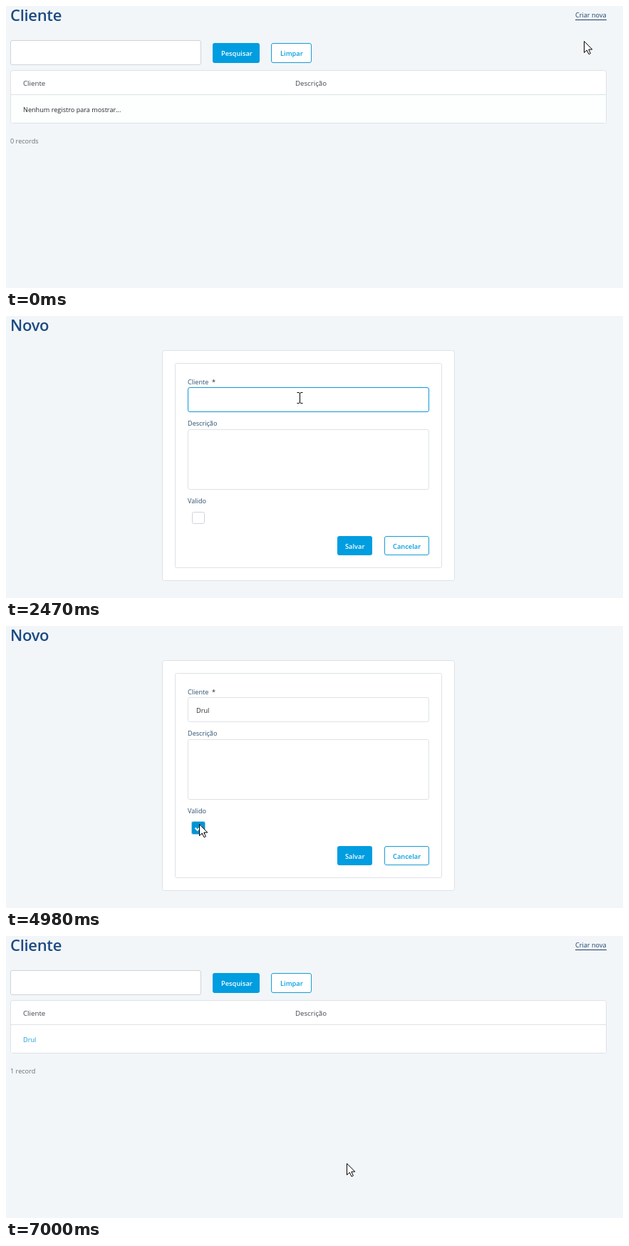
An HTML page for the animation above (7240 ms loop, 866 by 396 pixels).

```html
<!DOCTYPE html>
<html lang="pt">
<head>
<meta charset="utf-8">
<title>Cliente</title>
<style>
html, body { margin: 0; width: 100%; height: 100%; overflow: hidden; background: #f2f6f9; }
svg { display: block; width: 866px; height: 396px; }
text { font: 9.15px "Open Sans", "Noto Sans", sans-serif; fill: #272b30; white-space: pre; }
.title { font-size: 22px; font-weight: 600; letter-spacing: -.3px; fill: #1d4b82; }
.head { font-size: 9.7px; fill: #3d4650; }
.label { fill: #2b506f; }
.muted { fill: #6a7178; }
.button { font-size: 9.3px; font-weight: 600; fill: #009de0; }
.light { fill: #fff; }
.box { fill: #fff; stroke: #dee2e6; }
.field { stroke: #ced4da; }
.outline { stroke: #1a9bd3; }
.solid { fill: #009de0; }
.cursor path { fill: #fff; stroke: #000; stroke-linejoin: round; }
.cursor #beam { fill: none; }
</style>
</head>
<body>
<svg viewBox="0 0 866 396">
  <g id="list">
    <text class="title" x="6" y="21">Cliente</text>
    <text id="create" x="799" y="16">Criar nova</text>
    <path id="underline" d="M799 19.5H843"/>
    <rect class="box field" x="6.5" y="48.5" width="267" height="34" rx="2.5"/>
    <rect class="solid" x="290" y="52" width="66" height="28" rx="3"/>
    <text class="button light" x="302" y="70">Pesquisar</text>
    <rect class="box outline" x="372.5" y="52.5" width="56" height="27" rx="2.5"/>
    <text class="button" x="385" y="70">Limpar</text>
    <rect class="box" x="6.5" y="90.5" width="836" height="74" rx="3"/>
    <rect id="row" x="7" y="125" width="835" height="39" rx="2"/>
    <path d="M7 124.5H842" stroke="#dee2e6"/>
    <text class="head" x="24" y="112">Cliente</text>
    <text class="head" x="406" y="112">Descrição</text>
    <text id="cell" x="24" y="149"></text>
    <text id="count" class="muted" x="6" y="193"></text>
  </g>
  <g id="form">
    <text class="title" x="6" y="21">Novo</text>
    <rect class="box" x="219.5" y="48.5" width="410" height="323" rx="3"/>
    <rect class="box" x="237.5" y="66.5" width="374" height="287" rx="2"/>
    <text class="label" x="255" y="96">Cliente</text>
    <text x="289" y="96">*</text>
    <rect id="input" class="box" x="255.5" y="100.5" width="338" height="34" rx="2.5"/>
    <text id="typed" x="267" y="122"></text>
    <rect id="caret" y="111" width="1" height="13"/>
    <text class="label" x="255" y="154">Descrição</text>
    <rect class="box" x="255.5" y="159.5" width="338" height="84" rx="2.5"/>
    <text class="label" x="255" y="263">Valido</text>
    <rect class="box field" x="261.5" y="275.5" width="17" height="16" rx="2"/>
    <g id="checked">
      <rect id="ring" x="260" y="274" width="20" height="19" rx="3" fill="#a5cfe6"/>
      <rect x="261" y="275" width="18" height="17" rx="2" fill="#0094d6"/>
      <path d="M265.5 283.5L268.7 286.7 274.5 280.5" fill="none" stroke="#fff" stroke-width="2"/>
    </g>
    <rect id="save" x="465" y="309" width="49" height="27" rx="3"/>
    <text class="button light" x="476" y="327">Salvar</text>
    <rect class="box outline" x="531.5" y="309.5" width="62" height="26" rx="2.5"/>
    <text class="button" x="543" y="327">Cancelar</text>
  </g>
  <g id="cursor" class="cursor">
    <path id="arrow" d="M.5 .5V16.5L4.3 13 7 18.7 9.4 17.6 6.8 12H11.8z"/>
    <path id="hand" d="M-2 14V2Q-2 .5-.3 .5T1.5 2V9Q3 7.5 4.3 9.3 6 8.3 7 10 9.5 9.8 9.5 12V16Q9.5 19 7.5 21V23.5H-1.5V21.5L-6 15.5Q-7 13-5 12.5-4 12-2 14zM1.5 9V13M4.3 9.5V13M7 10.5V13"/>
    <path id="beam" d="M-3.5 -7.5H-1L.5 -6.5 2 -7.5H4.5M.5 -6.5V6.5M-3.5 7.5H-1L.5 6.5 2 7.5H4.5"/>
  </g>
</svg>
<script>
const LOOP = 7240;
const CLIENT = 'Drul';
const $ = id => document.getElementById(id);

// Bursts of screen updates: first time, last time, number of updates.
const bursts = [
  [0, 0, 1], [80, 250, 3], [400, 760, 6], [1160, 1230, 2], [1460, 1700, 4],
  [1940, 2090, 3], [2470, 2560, 2], [2790, 2790, 1], [2940, 3030, 2], [3490, 3490, 1],
  [3890, 4600, 10], [4750, 5440, 10], [5520, 6150, 9], [6320, 6550, 4], [6920, 7000, 2]
];

// Pointer track: time, x, y, shape from that time on.
const track = [
  [0, 811, 49, 'arrow'], [165, 813, 36, 'arrow'], [250, 817, 22, 'arrow'], [400, 820, 16, 'arrow'],
  [472, 823, 8, 'hand'], [544, 827, 1, 'hand'], [620, 828, 3, 'hand'], [760, 827, 10, 'hand'],
  [1400, 827, 10, 'hand'], [1460, 690, 48, 'arrow'], [1540, 510, 90, 'arrow'], [1620, 412, 115, 'beam'],
  [3850, 412, 115, 'beam'], [4125, 340, 190, 'beam'], [4205, 324, 220, 'beam'], [4280, 308, 246, 'arrow'],
  [4440, 283, 275, 'arrow'], [4600, 271, 278, 'arrow'], [5060, 271, 278, 'arrow'], [5215, 297, 284, 'arrow'],
  [5360, 354, 298, 'arrow'], [5440, 386, 307, 'arrow'], [5520, 417, 313, 'arrow'], [5598, 446, 318, 'arrow'],
  [5677, 467, 321, 'hand'], [5910, 478, 319, 'hand'], [6550, 478, 319, 'arrow'], [LOOP, 478, 319, 'arrow']
];

const between = (t, from, to) => t >= from && t < to;
const ramp = (t, from, to) => Math.min(1, Math.max(0, (t - from) / (to - from)));
const mix = (a, b, k) => a + (b - a) * k;
const blend = (a, b, k) => `rgb(${a.map((v, i) => Math.round(mix(v, b[i], k)))})`;
const show = (id, visible) => $(id).setAttribute('visibility', visible ? 'inherit' : 'hidden');
const fill = (id, color) => $(id).setAttribute('fill', color);

function lastUpdate(t) {
  const [start, end, count] = bursts.findLast(b => b[0] <= t);
  if (t >= end || count < 2) return Math.min(t, end);
  const step = (end - start) / (count - 1);
  return start + Math.floor((t - start) / step + 1e-6) * step;
}

function drawList(t) {
  const saved = t >= 6920;
  const hover = between(t, 472, 1160) ? ramp(t, 400, 620) : 0;
  const link = blend([29, 64, 104], [42, 132, 196], hover);
  $('create').style.fill = link;
  $('underline').setAttribute('stroke', link);
  fill('row', blend([252, 255, 254], [255, 255, 255], saved ? 1 : ramp(t, 0, 250)));
  $('cell').textContent = saved ? CLIENT : 'Nenhum registro para mostrar...';
  $('cell').style.fill = saved ? '#1a9fd8' : '';
  $('count').textContent = saved ? '1 record' : '0 records';
}

function drawForm(t) {
  const grey = [222, 226, 230], dark = [172, 182, 193], blue = [14, 152, 212];
  const hovered = blend(grey, dark, ramp(t, 1540, 1700));
  const focused = blend(dark, blue, ramp(t, 1860, 2090));
  const left = blend(blue, grey, ramp(t, 4670, 4980));
  $('input').style.stroke = t < 1940 ? hovered : t < 4750 ? focused : left;

  const letters = [2560, 2790, 2940, 3030].filter(time => t >= time).length;
  $('typed').textContent = CLIENT.slice(0, letters);
  const width = letters ? $('typed').getComputedTextLength() : 0;
  $('caret').setAttribute('x', Math.round(267 + width));
  show('caret', between(t, 1940, 2470) || between(t, 2560, 3490) || between(t, 3960, 4500));

  show('checked', t >= 4750);
  $('ring').setAttribute('opacity', 1 - ramp(t, 6240, 6550));
  fill('save', blend([0, 157, 224], [0, 139, 199], ramp(t, 5600, 5900)));
}

function drawCursor(t) {
  const i = Math.min(track.findLastIndex(p => p[0] <= t + .5), track.length - 2);
  const [t0, x0, y0, shape] = track[i], [t1, x1, y1] = track[i + 1];
  const k = ramp(t, t0, t1);
  const x = Math.round(mix(x0, x1, k)), y = Math.round(mix(y0, y1, k));
  $('cursor').setAttribute('transform', `translate(${x} ${y})`);
  for (const id of ['arrow', 'hand', 'beam']) show(id, id === shape);
}

function frame() {
  const t = lastUpdate(performance.now() % LOOP);
  const editing = between(t, 1160, 6920);
  show('list', !editing);
  show('form', editing);
  if (editing) drawForm(t); else drawList(t);
  drawCursor(t);
  requestAnimationFrame(frame);
}
frame();
</script>
</body>
</html>
```
